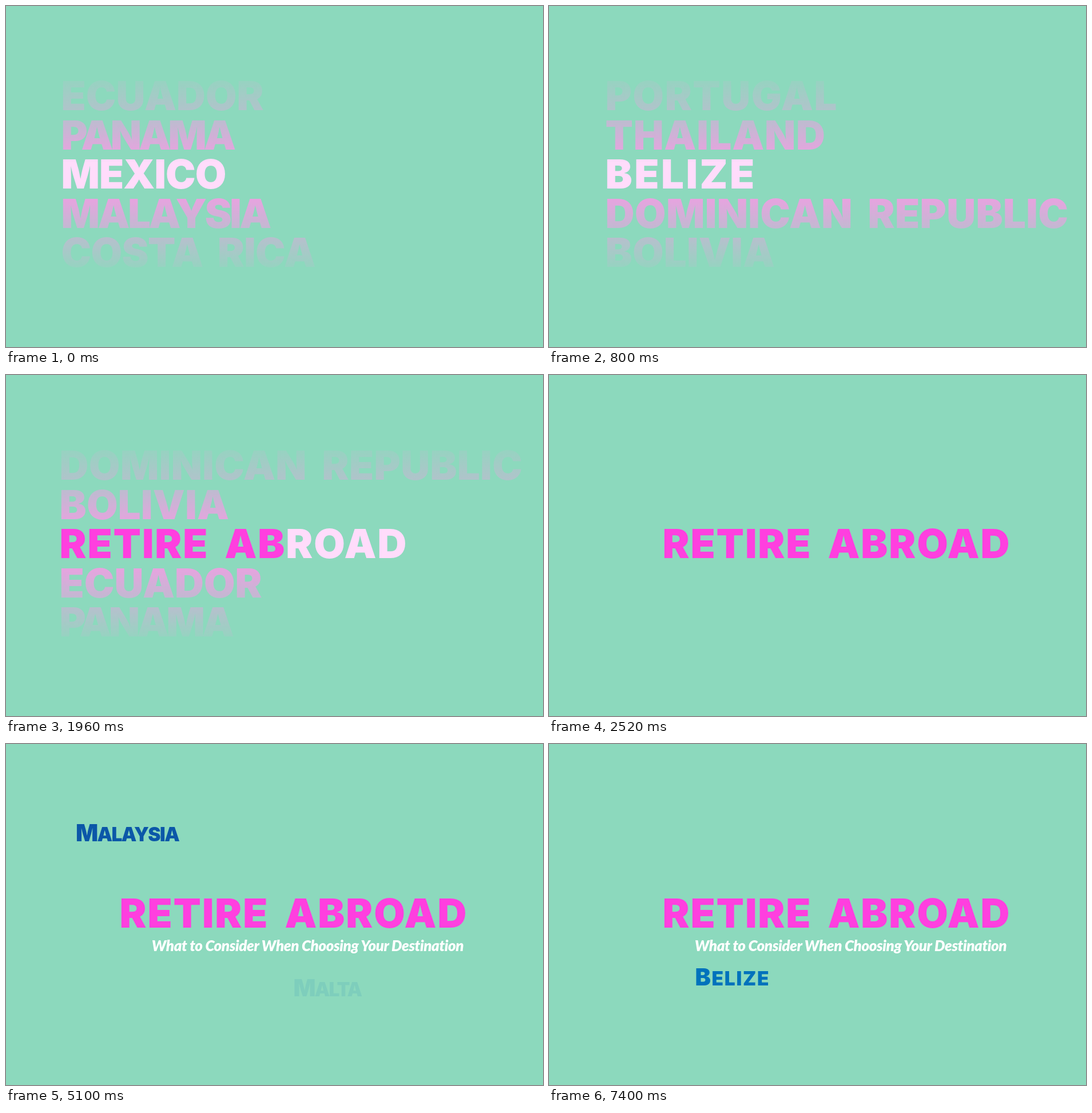
These frames come from a looping animation (939 px wide and 596 px high, 8000 ms). An HTML page:

```html
<!DOCTYPE html>
<html lang="en">
<head>
<meta charset="utf-8">
<title>Retire Abroad</title>
<style>
  html, body { margin: 0; width: 100%; height: 100%; overflow: hidden; background: #8cd9bd; }
  svg { display: block; width: 939px; height: 596px; }
  text { font-family: Inter, "Open Sans", sans-serif; font-weight: 900; font-optical-sizing: none; white-space: pre; }
  .big { font-size: 70.5px; word-spacing: 12px; }
  .label { font-size: 33.5px; word-spacing: 6px; }
  .label .cap { font-size: 41px; }
  #subtitle { font: italic 900 26px Lato, sans-serif; letter-spacing: -.45px; fill: #fff; text-anchor: middle; }
</style>
</head>
<body>
<svg id="stage" viewBox="0 0 939 596">
  <defs>
    <linearGradient id="veil" gradientUnits="userSpaceOnUse" x1="0" y1="0" x2="0" y2="596"></linearGradient>
    <linearGradient id="spot" gradientUnits="userSpaceOnUse" x1="0" y1="245" x2="0" y2="274">
      <stop stop-color="#ecd0ea"/>
      <stop offset="1" stop-color="#ffdcfb"/>
    </linearGradient>
  </defs>
  <rect width="939" height="596" fill="#8cd9bd"/>
  <g id="list"></g>
  <rect id="cover" y="-100" width="939" height="800" fill="url(#veil)"/>
  <text id="headline" class="big"></text>
  <text id="subtitle" x="527.5"></text>
  <g id="labels"></g>
</svg>
<script>
const LOOP = 8000, ROW = 68.5, BASE = 320, BEARING = 4.5, TITLE = 13, LABEL_SCALE = .48;
const LIGHT = '#ffdcfb', PINK = '#f39ce4', MAGENTA = '#ff3fdf';

// Each word with its tracking in px.
const words = [
  ['ECUADOR', 0], ['PANAMA', -4.8], ['MEXICO', -1], ['MALAYSIA', -3.4], ['COSTA RICA', -.7],
  ['SPAIN', 0], ['MALTA', -4], ['COLOMBIA', -.4], ['PORTUGAL', 1.6], ['THAILAND', .8],
  ['BELIZE', 3.6], ['DOMINICAN REPUBLIC', .4], ['BOLIVIA', .3], ['RETIRE ABROAD', 1.9]
];
const trackingOf = new Map(words);

// Text, ink position, color, and [time, opacity] changes.
const places = [
  ['Mexico', 576, 111.5, '#0b57a8', [[4200, 1], [4700, 0]]],
  ['Malaysia', 124.5, 169.5, '#0b57a8', [[4700, 1], [5800, 0]]],
  ['Malta', 505, 440.5, '#0068b4', [[5100, .09], [5800, 1], [6530, 0]]],
  ['Costa Rica', 376, 237.5, '#0068b4', [[6530, .7], [6930, 1], [7400, 0]]],
  ['Belize', 258, 421.5, '#0072bc', [[7400, 1]]]
];

const scrollKeys = [[0, 2.01], [400, 5.97], [800, 10.01], [1000, 12], [1100, 12.9], [1200, 13.3], [1300, 13.29], [1400, 13]];
const driftKeys = [[0, 101], [400, 103], [800, 103], [1300, 98]];
const veilStops = [[114, 1], [131, .9], [183, .65], [250, .18], [268, 0], [320, 0], [335, .1], [388, .46], [405, .58], [457, .9], [472, 1]];

const $ = id => document.getElementById(id);
const clamp = v => Math.max(0, Math.min(1, v));

function add(parent, tag, attrs, text = '') {
  const el = document.createElementNS('http://www.w3.org/2000/svg', tag);
  for (const name in attrs) el.setAttribute(name, attrs[name]);
  el.textContent = text;
  return parent.appendChild(el);
}

function along(keys, t) {
  for (let i = 1; i < keys.length; i++) {
    const [t0, a] = keys[i - 1], [t1, b] = keys[i];
    if (t < t1) return a + (b - a) * (t - t0) / (t1 - t0);
  }
  return keys[keys.length - 1][1];
}

for (const [y, alpha] of veilStops)
  add($('veil'), 'stop', { offset: y / 596, 'stop-color': '#8cd9bd', 'stop-opacity': alpha });

const rows = Array.from({ length: 17 }, (_, i) => {
  const [word, tracking] = words[i % words.length];
  return add($('list'), 'text', { class: 'big', 'letter-spacing': tracking }, word);
});

const [title, titleTracking] = words[TITLE];
$('headline').setAttribute('letter-spacing', titleTracking);
const letters = [...title].map(c => add($('headline'), 'tspan', {}, c)).filter(el => el.textContent !== ' ');

$('subtitle').textContent = 'What to Consider When Choosing Your Destination';

const labels = places.map(([name, x, y, fill, changes]) => {
  const tracking = trackingOf.get(name.toUpperCase()) * LABEL_SCALE;
  const el = add($('labels'), 'text', { class: 'label', x: x - 2.6, y, fill, 'letter-spacing': tracking });
  for (const c of name) {
    const small = c === c.toLowerCase();
    add(el, 'tspan', small ? {} : { class: 'cap' }, c.toUpperCase());
  }
  return { el, changes };
});

// The motion advances in held steps: 100 ms, then 70 ms.
function held(t) {
  const [start, step] = t < 1400 ? [0, 100] : t < 3090 ? [1400, 70] : [3090, 70];
  return start + Math.floor((t - start) / step) * step;
}

function draw(time) {
  const t = held(time);
  const pos = along(scrollKeys, t), x = along(driftKeys, t) - BEARING;
  const center = Math.round(pos);
  const settled = t >= 1400;
  const leave = clamp((t - 2310) / 210);

  // The veil travels with the five rows it frames.
  $('list').setAttribute('opacity', 1 - leave);
  $('cover').setAttribute('visibility', leave < 1 ? 'visible' : 'hidden');
  $('cover').setAttribute('transform', `translate(0 ${(center - pos) * ROW})`);
  rows.forEach((row, i) => {
    row.setAttribute('x', x);
    row.setAttribute('y', BASE + (i - pos) * ROW);
    row.setAttribute('fill', i === center ? 'url(#spot)' : PINK);
    row.setAttribute('visibility', settled && i === TITLE ? 'hidden' : 'visible');
  });

  const headline = $('headline');
  headline.setAttribute('visibility', settled ? 'visible' : 'hidden');
  headline.setAttribute('x', x + 105 * leave);
  headline.setAttribute('y', BASE + (t >= 3090 ? .7 : 0));
  letters.forEach((el, i) => el.setAttribute('fill', t >= 1470 + 70 * i ? MAGENTA : LIGHT));

  const rise = clamp((t - 3020) / 280);
  $('subtitle').setAttribute('y', 361.5 + 220 * (1 - rise) ** 2);
  $('subtitle').setAttribute('opacity', rise);

  for (const { el, changes } of labels) {
    const past = changes.filter(([at]) => time >= at);
    el.setAttribute('opacity', past.length ? past[past.length - 1][1] : 0);
  }
}

const start = performance.now();
function tick() {
  draw((performance.now() - start) % LOOP);
  requestAnimationFrame(tick);
}
tick();
</script>
</body>
</html>
```
